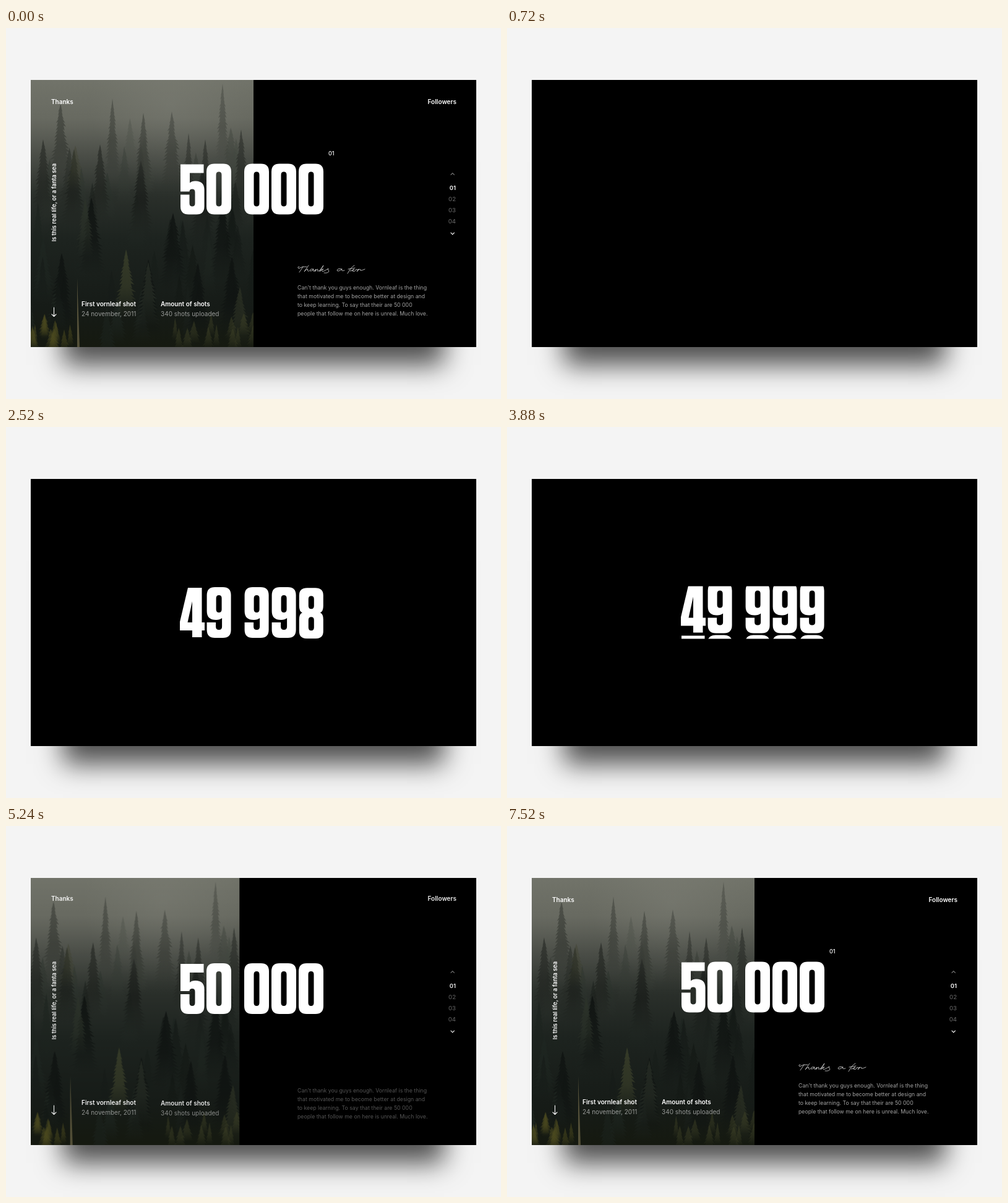
These frames come from a looping animation (800 px wide and 600 px high, 7.56 s). An HTML page with a canvas:

```html
<!DOCTYPE html>
<html lang="en">
<head>
<meta charset="utf-8">
<title>50 000 followers</title>
<style>
  html, body { margin: 0; width: 100%; height: 100%; overflow: hidden; background: #f4f4f4; }
  #stage { position: relative; width: 800px; height: 600px; overflow: hidden; }
  #card {
    position: absolute; left: 40px; top: 84px; width: 720px; height: 432px;
    background: #000; box-shadow: 0 81px 40px -52px rgba(0, 0, 0, .68);
  }
  canvas, #labels { position: absolute; left: 0; top: 0; width: 800px; height: 600px; }
  #labels span {
    position: absolute; white-space: pre; line-height: 14px; color: #fff;
    font-family: Inter, Roboto, sans-serif;
  }
</style>
</head>
<body>
<div id="stage">
  <div id="card"></div>
  <canvas id="view" width="800" height="600"></canvas>
  <div id="labels"></div>
</div>
<script>
const LOOP = 7560, REVEAL = 4720;
const ctx = document.getElementById('view').getContext('2d');
const labels = document.getElementById('labels');
const clamp = v => Math.max(0, Math.min(1, v));

// Cubic bezier easing with end handles at (x1, 0) and (x2, 1)
function bezier(x1, x2) {
  return p => {
    if (p <= 0) return 0;
    if (p >= 1) return 1;
    let lo = 0, hi = 1, s = 0.5;
    for (let i = 0; i < 24; i++) {
      s = (lo + hi) / 2;
      const x = 3 * (1 - s) * (1 - s) * s * x1 + 3 * (1 - s) * s * s * x2 + s * s * s;
      if (x < p) lo = s; else hi = s;
    }
    return s * s * (3 - 2 * s);
  };
}
const rollEase = bezier(0.4, 0.1);
const showEase = bezier(0.4, 0.06);
const shown = (t, start) => showEase((t - start) / 800);

// ---- Text ----
const TEXTS = [
  // text, x, baseline, size, weight, alpha, start offset, start time
  ['Thanks', 73, 123, 10, 600, 1, -20, 4750],
  ['Followers', -728, 123, 10, 600, 1, -20, 4750],
  ['First vornleaf shot', 122, 450, 10, 600, 1, 16, 4720],
  ['24 november, 2011', 122, 466, 10, 400, .55, 16, 4720],
  ['Amount of shots', 250, 450, 10, 600, 1, 16, 4810],
  ['340 shots uploaded', 250, 466, 10, 400, .55, 16, 4810],
  ["Can't thank you guys enough. Vornleaf is the thing", 471, 423, 8.75, 400, .64, 16, 5000],
  ['that motivated me to become better at design and', 471, 437, 8.75, 400, .64, 16, 5000],
  ['to keep learning. To say that their are 50 000', 471, 451, 8.75, 400, .64, 16, 5000],
  ['people that follow me on here is unreal. Much love.', 471, 465, 8.75, 400, .64, 16, 5000],
  ['01', -727, 262, 9.5, 600, 1, 0, 4720],
  ['02', -727, 280, 9.5, 500, .36, 0, 4720],
  ['03', -727, 298, 9.5, 500, .36, 0, 4720],
  ['04', -727, 316, 9.5, 500, .36, 0, 4720],
  ['01', 521, 206, 9, 500, 1, 0, 5280],
  ['Is this real life, or a fanta sea', 81, 345, 9.2, 600, 1, 0, 4720, true]
];
const items = TEXTS.map(([text, x, base, size, weight, alpha, dy, start, upright]) => {
  const el = document.createElement('span');
  const rise = 7 + 0.364 * size;
  el.textContent = text;
  el.style.fontSize = size + 'px';
  el.style.fontWeight = weight;
  if (x < 0) el.style.right = 800 + x + 'px';
  else el.style.left = x + 'px';
  el.style.top = base - rise + 'px';
  if (upright) el.style.transformOrigin = `0 ${rise}px`;
  labels.appendChild(el);
  return { el, alpha, dy, start, upright };
});

function placeLabels(t, fade) {
  const now = t < 760 ? LOOP : t;
  labels.style.opacity = fade;
  for (const { el, alpha, dy, start, upright } of items) {
    const e = shown(now, start);
    el.style.opacity = alpha * e;
    el.style.transform = upright ? 'rotate(-90deg)' : `translateY(${dy * (1 - e)}px)`;
  }
}

// ---- Forest ----
let seed = 11;
const rnd = () => (seed = (seed * 16807) % 2147483647) / 2147483647;

function makeForest() {
  const cv = document.createElement('canvas');
  cv.width = 360;
  cv.height = 432;
  const g = cv.getContext('2d');
  const shade = (x0, y0, x1, y1, stops) => {
    const gr = g.createLinearGradient(x0, y0, x1, y1);
    stops.forEach(([at, c]) => gr.addColorStop(at, c));
    return gr;
  };
  g.fillStyle = shade(0, 0, 0, 432, [[0, '#6d6f66'], [.14, '#66685f'], [.27, '#474a44'],
    [.42, '#2b302b'], [.6, '#1d231f'], [.85, '#161b17'], [1, '#151910']]);
  g.fillRect(0, 0, 360, 432);

  function tree(x, y, w, h, rgb, a) {
    const n = Math.round(h / 6), right = [], left = [];
    for (let i = 1; i <= n; i++) {
      const yy = y + h * i / n, half = w * Math.pow(i / n, .8);
      const r = half * (.75 + rnd() * .4), l = half * (.75 + rnd() * .4);
      right.push([x + r, yy + 2], [x + r * .55, yy]);
      left.push([x - l, yy + 2], [x - l * .55, yy]);
    }
    g.beginPath();
    g.moveTo(x, y);
    right.forEach(p => g.lineTo(...p));
    left.reverse().forEach(p => g.lineTo(...p));
    g.closePath();
    g.fillStyle = shade(0, y, 0, y + h, [[0, `rgba(${rgb},${a})`],
      [.55, `rgba(${rgb},${a * .8})`], [1, `rgba(${rgb},0)`]]);
    g.fill();
  }
  const tone = (y, k) => {
    const f = clamp(1 - y / 190);
    return [24 + 42 * f, 30 + 40 * f, 26 + 36 * f].map(v => Math.round(v * k)).join();
  };

  // Distant rows, then nearer ones
  for (let i = 0; i < 46; i++) {
    const y = 62 + i * 6.6 + rnd() * 22;
    tree(rnd() * 370 - 5, y, 13 + rnd() * 9, 75 + rnd() * 50, tone(y, .72 + rnd() * .6), .7);
  }
  const MAIN = [
    [310, 6, 13], [132, 30, 14], [48, 38, 22], [182, 53, 17], [228, 51, 20], [255, 86, 15],
    [340, 80, 17], [282, 96, 18], [20, 96, 20], [112, 104, 20], [70, 112, 24], [178, 130, 24],
    [278, 140, 25], [98, 190, 25], [310, 200, 25], [230, 215, 27], [50, 280, 26],
    [190, 290, 25], [325, 286, 26], [270, 296, 26]
  ];
  MAIN.forEach(([x, y, w]) => tree(x, y, w, 125, tone(y, .64), .85));
  tree(154, 274, 21, 110, '59,64,42', .8);
  tree(72, 106, 18, 70, '55,57,37', .5);
  tree(88, 192, 18, 95, '44,51,41', .7);
  tree(190, 294, 20, 105, '47,54,44', .6);
  tree(338, 335, 22, 95, '48,53,38', .65);

  // Yellowish growth along the lower edge
  for (let i = 0; i < 26; i++) {
    const onLeft = i % 2;
    const x = onLeft ? rnd() * 65 : 230 + rnd() * 130;
    tree(x, 370 + rnd() * 42, 7 + rnd() * 7, 36, onLeft ? '78,76,31' : '60,63,37', .55);
  }
  g.fillStyle = 'rgba(105,99,70,.75)';
  g.beginPath();
  g.moveTo(75, 320);
  g.lineTo(79, 432);
  g.lineTo(75, 432);
  g.fill();

  // Mist over the upper slope
  g.fillStyle = shade(0, 0, 0, 190, [[0, 'rgba(116,118,108,.6)'], [.35, 'rgba(106,108,99,.4)'],
    [1, 'rgba(80,84,77,0)']]);
  g.fillRect(0, 0, 360, 190);
  const glow = g.createRadialGradient(225, 40, 0, 225, 40, 130);
  glow.addColorStop(0, 'rgba(140,141,132,.25)');
  glow.addColorStop(1, 'rgba(140,141,132,0)');
  g.fillStyle = glow;
  g.fillRect(0, 0, 360, 200);
  return cv;
}
const forest = makeForest();

// ---- Big number ----
const slot = (x, y, b) =>
  `M${x + 4.5} ${y}Q${x} ${y} ${x} ${y + 5}V${b - 5}Q${x} ${b} ${x + 4.5} ${b}` +
  `Q${x + 9} ${b} ${x + 9} ${b - 5}V${y + 5}Q${x + 9} ${y} ${x + 4.5} ${y}Z`;
const GLYPHS = {
  0: [0, 'M13 0H27Q40 0 40 13V69Q40 82 27 82H13Q0 82 0 69V13Q0 0 13 0Z' + slot(15.5, 13, 69)],
  4: [-1, 'M13 1H35.5V57H40V70H35.5V81H20V70H0V56ZM20 23L12.5 57H20Z'],
  5: [0, 'M0 1H37.5V15H15V31Q18 28 24 28Q38.5 28 38.5 42V69Q38.5 82 26 82H13Q0 82 0 69V50H14.5' +
    'V64Q14.5 69 19 69Q23.5 69 23.5 64V46Q23.5 41 19 41Q14.5 41 14.5 45H0Z'],
  7: [0, 'M0 1H35V16L23 81H7L19 15H0Z'],
  8: [.8, 'M13 0H26Q39 0 39 12V29Q39 38 34 40Q39 42 39 51V70Q39 82 26 82H13Q0 82 0 70V51' +
    'Q0 42 5 40Q0 38 0 29V12Q0 0 13 0Z' + slot(15, 13, 34) + slot(15, 47, 69)],
  9: [.6, 'M13 0H26Q39 0 39 13V69Q39 82 26 82H13Q0 82 0 69V57H14.5V64Q14.5 69 19.5 69' +
    'Q24.5 69 24.5 64V50Q21 53 15 53Q0 53 0 39V13Q0 0 13 0Z' + slot(15, 13, 41)]
};
for (const k in GLYPHS) GLYPHS[k][1] = new Path2D(GLYPHS[k][1]);
const COLS = [282, 324, 385, 429, 473];
const COUNTS = ['49997', '49998', '49999', '50000'];
const ROLLS = [1700, 2710, 3720];
const PITCH = 85, TOP = 259;

function digit(ch, col, y) {
  const [dx, path] = GLYPHS[ch];
  ctx.save();
  ctx.translate(COLS[col] + dx, y);
  ctx.fill(path, 'evenodd');
  ctx.restore();
}

function drawCount(t) {
  let k = 0;
  while (k < 2 && t >= ROLLS[k + 1]) k++;
  const e = rollEase((t - ROLLS[k]) / 1000);
  ctx.save();
  ctx.beginPath();
  ctx.rect(270, 257.5, 260, 85);
  ctx.clip();
  for (let c = 0; c < 5; c++) {
    const a = COUNTS[k][c], b = COUNTS[k + 1][c];
    if (a === b) { digit(a, c, TOP); continue; }
    digit(a, c, TOP - PITCH * e);
    digit(b, c, TOP + PITCH * (1 - e));
  }
  ctx.restore();
}

// ---- Line work ----
const SCRIPT = new Path2D(
  'M474 386Q470 386 473 389Q479 385 486 386M480 386Q477 391 474 395' +
  'M489 384Q484 391 482 394Q486 389 488 390Q486 394 490 393' +
  'M497 390Q492 389 491 392Q492 395 497 390Q495 394 498 393' +
  'L501 390L499 394Q504 388 504 391Q502 395 507 392' +
  'Q512 387 513 384Q509 389 507 394Q510 389 513 390Q510 391 510 392Q511 395 516 392' +
  'L521 389Q519 391 522 393Q521 397 514 396' +
  'M543 390Q536 388 535 392Q536 395 543 390Q541 394 547 392' +
  'M563 384Q558 386 552 397M553 390Q559 389 564 388' +
  'M556 393Q560 393 563 390Q559 391 560 393Q564 395 566 390Q567 392 570 390' +
  'L567 394Q572 388 573 391Q571 394 580 390');
const ARROW = new Path2D('M77.5 452V466.5M74 463L77.5 466.5L81 463');
const UP = new Path2D('M719 237.3L721.7 234.6L724.4 237.3');
const DOWN = new Path2D('M719 331.2L721.7 333.9L724.4 331.2');

function line(path, alpha, width) {
  ctx.strokeStyle = `rgba(255,255,255,${alpha})`;
  ctx.lineWidth = width;
  ctx.stroke(path);
}

function drawScene(t) {
  const e = shown(t, REVEAL), w = 360 * e;
  ctx.save();
  ctx.beginPath();
  ctx.rect(40, 84, w, 432);
  ctx.clip();
  ctx.drawImage(forest, 40 + (w - 360) / 2, 84);
  ctx.restore();

  [...'50000'].forEach((ch, c) => digit(ch, c, TOP - 39.5 * e));
  line(ARROW, e, 1.1);
  line(UP, .5 * e, 1.1);
  line(DOWN, e, 1.2);

  const s = clamp((t - 5280) / 800);
  if (s > 0) {
    ctx.save();
    ctx.beginPath();
    ctx.rect(468, 376, 116 * s, 28);
    ctx.clip();
    line(SCRIPT, .85, .8);
    ctx.restore();
  }
}

function draw(t) {
  ctx.clearRect(0, 0, 800, 600);
  ctx.fillStyle = '#fff';
  ctx.lineCap = ctx.lineJoin = 'round';
  const leaving = t < 760;
  const fade = leaving ? 1 - clamp((t - 10) / 700) : t >= REVEAL ? 1 : 0;
  placeLabels(t, fade);
  if (fade > 0) {
    ctx.globalAlpha = fade;
    drawScene(leaving ? LOOP : t);
  } else if (!leaving) {
    ctx.globalAlpha = clamp((t - 760) / 320);
    drawCount(t);
  }
  ctx.globalAlpha = 1;
}

const began = performance.now();
function tick() {
  draw((performance.now() - began) % LOOP);
  requestAnimationFrame(tick);
}
tick();
</script>
</body>
</html>
```
